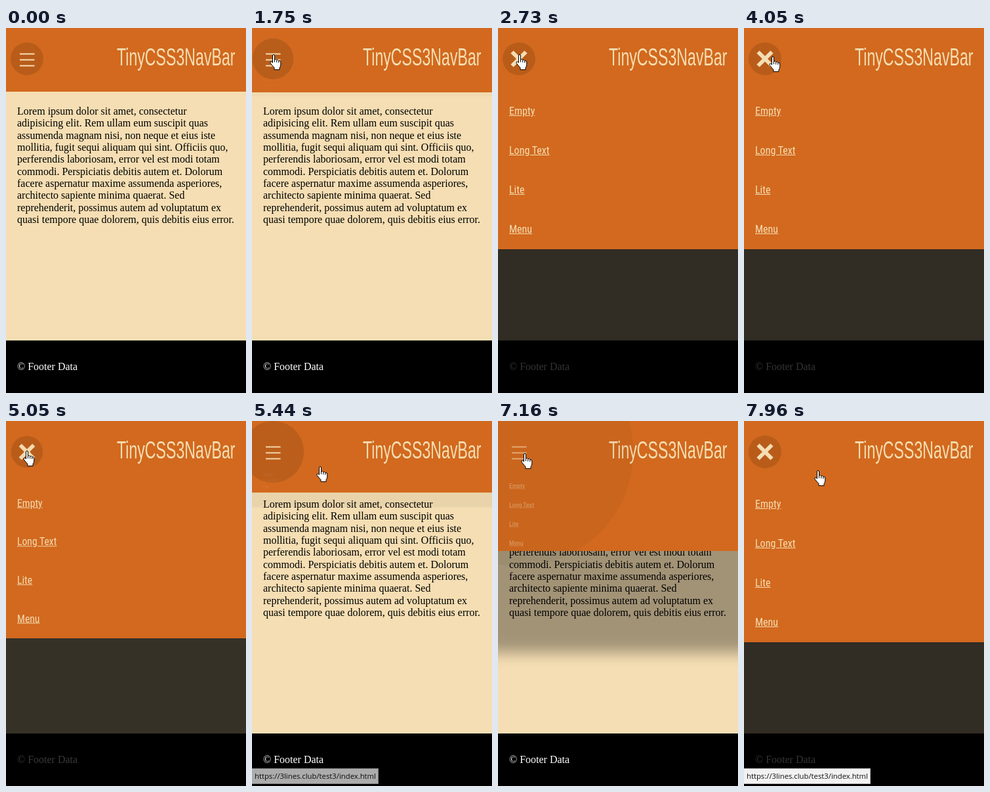
Recreate the animation shown at these times as an HTML page. Size 366x556 px, loop 8000 ms.

```html
<!DOCTYPE html>
<html lang="en">
<head>
<meta charset="utf-8">
<title>TinyCSS3NavBar</title>
<style>
html, body { margin: 0; width: 100%; height: 100%; overflow: hidden; background: #f5deb3; }
#stage { position: relative; width: 366px; height: 556px; overflow: hidden; background: #f5deb3; }
#stage > * { position: absolute; }
.text { left: 17px; margin: 0; white-space: nowrap; font: 16px/18.35px "Liberation Serif", "Times New Roman", serif; }
main { top: 118px; color: #000; }
footer { left: 0; top: 476px; width: 366px; height: 80px; background: #000; }
footer .text { position: absolute; top: 31px; color: #fff; }
header { left: 0; top: 0; width: 366px; overflow: hidden; background: #d2691e; color: #f5deb3; }
h1 {
  position: absolute; right: 17px; top: 31px; margin: 0; white-space: nowrap;
  font: 23.15px/26px "Liberation Sans", Arial, sans-serif; transform: scaleY(1.58);
}
nav a {
  position: absolute; left: 17px; top: -10px; height: 20px; white-space: nowrap;
  font: 16px/20px "Roboto Condensed", Roboto, sans-serif; font-stretch: condensed;
  text-decoration: underline; transform-origin: 0 50%;
}
svg { left: 0; top: 0; overflow: visible; }
#status {
  left: 0; top: 529px; width: 193px; height: 24px; box-sizing: border-box; padding-left: 4px;
  border: 1px solid #b4b4b4; border-left: 0; background: #f2f2f2; color: #111;
  font: 11.3px/22px "Open Sans", "Noto Sans", sans-serif; white-space: nowrap;
}
</style>
</head>
<body>
<div id="stage">
  <main class="text">Lorem ipsum dolor sit amet, consectetur<br>
adipisicing elit. Rem ullam eum suscipit quas<br>
assumenda magnam nisi, non neque et eius iste<br>
mollitia, fugit sequi aliquam qui sint. Officiis quo,<br>
perferendis laboriosam, error vel est modi totam<br>
commodi. Perspiciatis debitis autem et. Dolorum<br>
facere aspernatur maxime assumenda asperiores,<br>
architecto sapiente minima quaerat. Sed<br>
reprehenderit, possimus autem ad voluptatum ex<br>
quasi tempore quae dolorem, quis debitis eius error.</main>
  <footer><p class="text">© Footer Data</p></footer>
  <header>
    <h1>TinyCSS3NavBar</h1>
    <nav><a>Empty</a><a>Long Text</a><a>Lite</a><a>Menu</a></nav>
  </header>
  <svg width="366" height="556">
    <circle id="ripple" cx="32" cy="47"/>
    <path id="bars" d="M21 39.5H43.5M21 48.5H43.5M21 57.5H43.5" stroke="#f5deb3" stroke-width="2"/>
    <g id="close">
      <circle r="25" fill-opacity=".12"/>
      <path d="M-10.5 -10.5L10.5 10.5M10.5 -10.5L-10.5 10.5" stroke="#f5deb3" stroke-width="6"/>
    </g>
  </svg>
  <div id="status">https://3lines.club/test3/index.html</div>
  <svg id="cursor" width="20" height="26" fill="#fff" stroke="#000" stroke-linejoin="round">
    <g id="hand">
      <path d="M-1.5 2Q-1.5 .5 0 .5Q1.5 .5 1.5 2V8Q4 7 4.7 8.7Q7.2 8 7.8 9.7Q10.8 9.2 10.8 12V16Q10.8 18.5 9 20.5V23.5H1V20.5Q-2.5 17 -4.9 13.5Q-5.5 11.5 -3.7 11Q-2.5 11 -1.5 13Z"/>
      <path d="M1.5 8V12M4.7 9V12.5M7.8 10V13" fill="none"/>
    </g>
    <path id="arrow" d="M.5 .5V16.5L4.2 13L6.6 18.8L9.2 17.7L6.8 12.1H11.8Z"/>
  </svg>
</div>
<script>
const LOOP = 8000, MOVE = 600;
const $ = s => document.querySelector(s);
const header = $('header'), links = document.querySelectorAll('nav a');
const ripple = $('#ripple'), bars = $('#bars'), cross = $('#close');
const statusBar = $('#status'), cursor = $('#cursor'), hand = $('#hand'), arrow = $('#arrow');

const clamp = v => Math.min(1, Math.max(0, v));
const mix = (a, b, k) => a + (b - a) * k;
const smooth = k => k * k * (3 - 2 * k);

// CSS "ease": cubic-bezier(.25, .1, .25, 1)
function ease(x) {
  if (x <= 0 || x >= 1) return clamp(x);
  const curve = (a, b, u) => 3 * a * u * (1 - u) ** 2 + 3 * b * u * u * (1 - u) + u ** 3;
  let lo = 0, hi = 1;
  for (let i = 0; i < 24; i++) {
    const mid = (lo + hi) / 2;
    if (curve(.25, .25, mid) < x) lo = mid; else hi = mid;
  }
  return curve(.1, 1, lo);
}

// Clicks that open and close the menu
const OPEN_1 = 1732, SHUT = 5026, OPEN_2 = 7006;

function toggle(t, delay, span) {
  if (t >= OPEN_2) return ease((t - OPEN_2 - delay) / span);
  if (t >= SHUT) return 1 - ease((t - SHUT) / MOVE);
  return ease((t - OPEN_1 - delay) / span);
}

// Pointer tip: time, x, y
const PATH = [
  [350, 256, 480], [900, 120, 80], [1220, 33, 40],
  [3950, 33, 40], [4210, 66, 50], [4400, 66, 50], [4680, 25, 33], [4900, 32, 45],
  [5050, 32, 45], [5440, 104, 69], [5650, 108, 72], [6030, 108, 72], [6700, 41, 49],
  [7200, 41, 49], [7780, 113, 75]
];

function pointer(t) {
  const i = PATH.findIndex(p => p[0] > t);
  if (i < 0) return PATH[PATH.length - 1].slice(1);
  const a = PATH[i - 1], b = PATH[i], k = smooth((t - a[0]) / (b[0] - a[0]));
  return [mix(a[1], b[1], k), mix(a[2], b[2], k)];
}

// Link address: fade-in start, fade-out start
const HINTS = [[850, 1150], [5370, 6480], [7600, 9000]];

function draw(t) {
  const q = toggle(t, 0, MOVE), c = toggle(t, 300, 650);

  const top = mix(70, 97, q), row = mix(6, 60, q);
  header.style.height = Math.max(97, top + 4 * row) + 'px';
  header.style.boxShadow = `0 0 ${50 * q}px ${366 * q}px rgba(0,0,0,${.8 * q})`;
  links.forEach((a, i) => {
    const y = top + row * (i + .5) + 5 * (1 - q);
    a.style.transform = `translateY(${y}px) scale(${mix(.33, 1, q)})`;
    a.style.opacity = q ** .8;
  });

  ripple.setAttribute('r', 25 + 350 * q);
  ripple.setAttribute('fill-opacity', .12 * (1 - q) ** 2);
  bars.setAttribute('opacity', 1 - q);
  cross.setAttribute('transform', `translate(32 47) scale(${c})`);
  cross.setAttribute('opacity', c);

  const hint = HINTS.find(h => t >= h[0] && t < h[1] + 100);
  statusBar.style.opacity = hint ? Math.min(clamp((t - hint[0]) / 100), clamp((hint[1] + 100 - t) / 100)) : 0;

  const shown = t >= PATH[0][0];
  cursor.style.display = shown ? '' : 'none';
  if (shown) {
    const [x, y] = pointer(t).map(Math.round);
    cursor.style.transform = `translate(${x}px,${y}px)`;
    const overPage = y > 97;
    hand.style.display = overPage ? 'none' : '';
    arrow.style.display = overPage ? '' : 'none';
  }
}

const start = performance.now();
function tick() {
  draw((performance.now() - start) % LOOP);
  requestAnimationFrame(tick);
}
tick();
</script>
</body>
</html>
```
